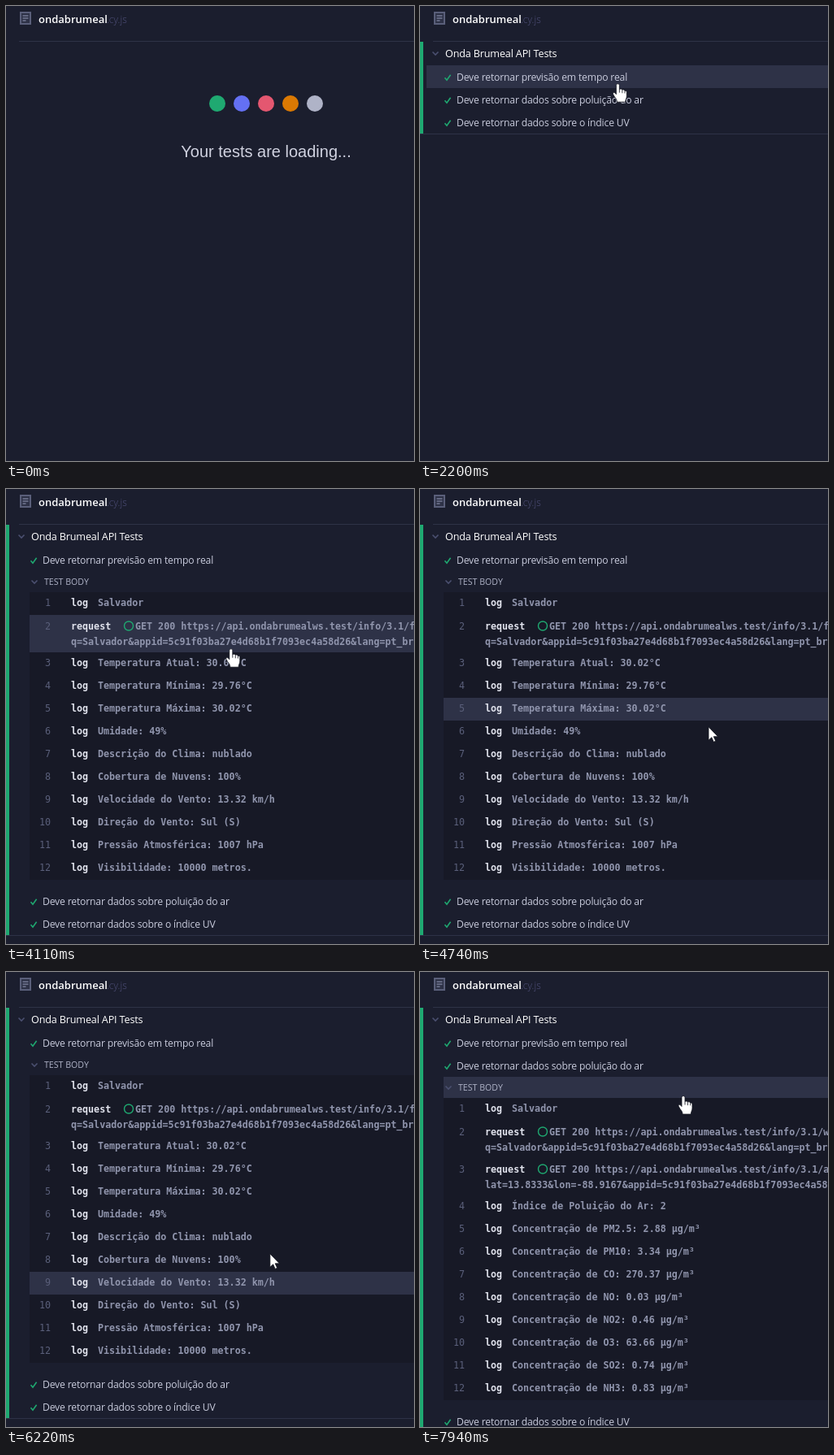
These frames come from a looping animation (502x560 px, 8000 ms). An HTML page:

```html
<!DOCTYPE html>
<html lang="pt">
<head>
<meta charset="utf-8">
<title>Test runner</title>
<style>
html, body { margin: 0; width: 100%; height: 100%; overflow: hidden; background: #1b1e2e; }
svg { display: block; width: 502px; height: 560px; }
text { white-space: pre; font-family: "Open Sans", "Noto Sans", sans-serif; }
.file { font-size: 13px; font-weight: 600; fill: #fff; }
.ext { font-size: 12px; font-weight: 300; fill: #50517c; }
.wait { font: 20px "Liberation Sans", Arial, sans-serif; fill: #d0d2e0; }
.suite { font-size: 12.6px; letter-spacing: -.15px; fill: #fff; }
.test { font-size: 12.2px; letter-spacing: -.18px; fill: #c8cbdc; }
.head { font-size: 10.6px; fill: #afb3c7; }
.mono { font: 700 11.68px "DejaVu Sans Mono", "Noto Sans Mono", monospace; fill: #9095ad; }
.num { font-weight: 400; fill: #5a5f7a; }
.cmd { fill: #e1e3ed; }
.line { fill: none; stroke-width: 1.6; }
</style>
</head>
<body>
<svg id="stage" viewBox="0 0 502 560"></svg>
<script>
const LOOP = 8000, STEP = 70;
const HOST = "https://api.ondabrumealws.test/info/3.1/";
const KEY = "5c91f03ba27e4d68b1f7093ec4a58d26";
const TESTS = [
  "Deve retornar previsão em tempo real",
  "Deve retornar dados sobre poluição do ar",
  "Deve retornar dados sobre o índice UV"
];
// A row with two entries is a request: address and query.
const LOGS = [
  ["Salvador", ["forecast?", `q=Salvador&appid=${KEY}&lang=pt_br`],
   "Temperatura Atual: 30.02°C", "Temperatura Mínima: 29.76°C", "Temperatura Máxima: 30.02°C",
   "Umidade: 49%", "Descrição do Clima: nublado", "Cobertura de Nuvens: 100%",
   "Velocidade do Vento: 13.32 km/h", "Direção do Vento: Sul (S)",
   "Pressão Atmosférica: 1007 hPa", "Visibilidade: 10000 metros."],
  ["Salvador", ["weather?", `q=Salvador&appid=${KEY}&lang=pt_br`],
   ["air?", `lat=13.8333&lon=-88.9167&appid=${KEY}`],
   "Índice de Poluição do Ar: 2",
   ...["PM2.5: 2.88", "PM10: 3.34", "CO: 270.37", "NO: 0.03", "NO2: 0.46",
       "O3: 63.66", "SO2: 0.74", "NH3: 0.83"].map(s => `Concentração de ${s} µg/m³`)]
];
const HEAD = 26, ROW = 28, TALL = 46, TOP = 73, GAP = 12;

const LOADED = 330, TEST_TIME = 350;
const passTime = i => LOADED + TEST_TIME * (i + 1);
// Clicks: time and the test left open (-1 for none).
const TOGGLES = [[2480, 0], [7050, -1], [7590, 1]];
// Pointer stops: time, x, y.
const STOPS = [
  [1710, 488, 300], [2130, 240, 96], [2340, 250, 95], [2860, 250, 95], [2910, 256, 105],
  [3420, 256, 105], [3630, 217, 123.5], [4740, 355, 292.5], [5020, 361, 355],
  [5660, 337, 424.8], [6010, 331, 461], [6700, 311, 87.5], [7180, 311, 87.5],
  [7480, 319, 117], [7820, 320, 118], [7940, 324, 152.5]
];

const text = (cls, x, y, s, more = "") =>
  `<text class="${cls}" x="${x}" y="${y}" ${more}>${s.replace(/&/g, "&amp;")}</text>`;
const chevron = (x, y) =>
  `<path class="line" stroke="#4b5070" d="M${x - 3.5} ${y - 1.5}l3.5 3.5 3.5-3.5"/>`;
const rowHeight = row => Array.isArray(row) ? TALL : ROW;
const bodyHeight = LOGS.map(rows => rows.reduce((sum, row) => sum + rowHeight(row), 0));

function logBody(rows, i) {
  let y = HEAD, out = chevron(35, 13) + text("head", 47, 17, "TEST BODY");
  rows.forEach((row, n) => {
    const wide = Array.isArray(row), base = y + (wide ? 18 : 17);
    out += text("mono num", 55, base, String(n + 1), 'text-anchor="end"');
    out += text("mono cmd", 80, base, wide ? "request" : "log");
    if (wide) {
      out += `<circle cx="151" cy="${y + 13.5}" r="5.5" fill="none" stroke="#1fa971" stroke-width="1.4"/>`;
      out += text("mono", 159, base, "GET 200 " + HOST + row[0]) + text("mono", 80, base + 19, row[1]);
    } else {
      out += text("mono", 113, base, row);
    }
    y += rowHeight(row);
  });
  return `<g id="body${i}">${out}</g>`;
}

const testRow = (name, i) => `<g id="test${i}">
  <circle id="ring${i}" class="line" cx="34" cy="15" r="4"/>
  <path id="check${i}" class="line" stroke="#1fa971" d="M30.5 15.2l2.5 3 4.6-6.4"/>
  ${text("test", 45, 19, name)}</g>`;

const dots = ["#1fa971", "#6470f3", "#e45770", "#db7903", "#afb3c7"]
  .map((c, i) => `<circle cx="${260 + 30 * i}" cy="120" r="10" fill="${c}"/>`).join("");

document.getElementById("stage").innerHTML = `
  <rect width="502" height="560" fill="#1b1e2e"/>
  <rect x="18" y="8" width="12" height="14" fill="#2e3247" stroke="#5a5f7a" stroke-width="2"/>
  <path d="M20.5 12h7M20.5 15h7M20.5 18h4" stroke="#747994" stroke-width="1.3"/>
  ${text("file", 40, 21, "ondabrumeal")}${text("ext", 124, 21, ".cy.js")}
  <rect x="16" y="43" width="486" height="1" fill="#2e3247"/>
  <g id="loading">${dots}${text("wait", 320, 186, "Your tests are loading...", 'text-anchor="middle"')}</g>
  <g id="list">
    <rect id="bar" y="44" width="4" fill="#1fa971"/>
    <rect id="foot" width="502" height="1" fill="#2e3247"/>
    <rect id="panel" x="29" width="473" fill="#171926"/>
    <rect id="hover" fill="#2e3247"/>
    ${chevron(19, 58)}${text("suite", 31, 63, "Onda Brumeal API Tests")}
    ${TESTS.map(testRow).join("")}${LOGS.map(logBody).join("")}
  </g>
  <circle id="click" r="12" fill="#8f8d26"/>
  <g id="pointer" fill="#fff" stroke="#10121c" stroke-width=".8" stroke-linejoin="round">
    <path id="arrow" d="M0 0V16.5L3.8 13L6.3 18.6L8.8 17.5L6.3 12H11.5Z"/>
    <path id="hand" d="M-2 2C-2-.5 2-.5 2 2V7C3 6 5 6.3 5.5 7.6C6.6 6.8 8.4 7.3 8.6 8.8C9.8 8.2 11 9 11 10.5V15C11 18 9.5 19 9.3 22.5H-1C-1 20-2 18.5-4 16L-6 12.5C-6.4 10.8-4.3 10.2-3.2 11.6L-2 13ZM2 7v4M5.5 7.6v4M8.6 8.8v3"/>
  </g>`;

const $ = id => document.getElementById(id);
const set = (id, attrs) => { for (const k in attrs) $(id).setAttribute(k, attrs[k]); };
const show = (id, on) => set(id, { display: on ? "inline" : "none" });
const move = (id, x, y) => set(id, { transform: `translate(${x} ${y})` });

function tipAt(t) {
  const next = STOPS.findIndex(p => p[0] > t);
  if (next <= 0) return STOPS.at(next).slice(1);
  const [a, b] = [STOPS[next - 1], STOPS[next]], k = (t - a[0]) / (b[0] - a[0]);
  return [1, 2].map(i => a[i] + (b[i] - a[i]) * k);
}

const testTop = (i, open) =>
  TOP + ROW * i + (open >= 0 && i > open ? HEAD + bodyHeight[open] + GAP : 0);

// Every place that lights up under the pointer, as [x, y, height].
function zones(open) {
  const list = TESTS.map((_, i) => [8, testTop(i, open), ROW]);
  if (open < 0) return list;
  let y = testTop(open, open) + ROW;
  for (const h of [HEAD, ...LOGS[open].map(rowHeight)]) {
    list.push([29, y, h]);
    y += h;
  }
  return list;
}

function drawTests(t, open) {
  TESTS.forEach((_, i) => {
    const done = t >= passTime(i), running = !done && t >= passTime(i - 1);
    move("test" + i, 0, testTop(i, open));
    show("check" + i, done);
    show("ring" + i, !done);
    set("ring" + i, {
      stroke: running ? "#6470f3" : "#5a5f7a",
      "stroke-dasharray": running ? "17 8.1" : "1.5 1.64",
      transform: `rotate(${running ? t / 2 % 360 : 0} 34 15)`
    });
  });
  const last = TESTS.length - 1, end = testTop(last, open) + ROW;
  set("bar", { height: end - 44 });
  set("foot", { y: end });
  show("bar", t >= passTime(last));
  show("panel", open >= 0);
  LOGS.forEach((_, i) => show("body" + i, i === open));
  if (open >= 0) {
    const y = testTop(open, open) + ROW;
    move("body" + open, 0, y);
    set("panel", { y: y + HEAD, height: bodyHeight[open] });
  }
}

function drawPointer(t, open) {
  const on = t >= STOPS[0][0], [x, y] = tipAt(t), list = zones(open);
  const under = py => list.find(z => py >= z[1] && py < z[1] + z[2]);
  // The highlight trails the pointer; the hand returns once it has caught up.
  const zone = on && under(tipAt(t - STEP)[1]);
  const hand = zone && zone === under(y);
  show("hover", zone);
  if (zone) set("hover", { x: zone[0], y: zone[1], width: 502 - zone[0], height: zone[2] });
  show("pointer", on);
  show("hand", hand);
  show("arrow", !hand);
  move("pointer", x, y);
  show("click", TOGGLES.some(([at]) => t >= at - STEP && t < at));
  set("click", { cx: x - 3, cy: y });
}

function draw(t) {
  const open = TOGGLES.reduce((state, [at, next]) => t >= at ? next : state, -1);
  show("loading", t < LOADED);
  show("list", t >= LOADED);
  drawTests(t, open);
  drawPointer(t, open);
}

const start = performance.now();
function tick(now) {
  draw(Math.max(0, now - start) % LOOP);
  requestAnimationFrame(tick);
}
draw(0);
requestAnimationFrame(tick);
</script>
</body>
</html>
```
